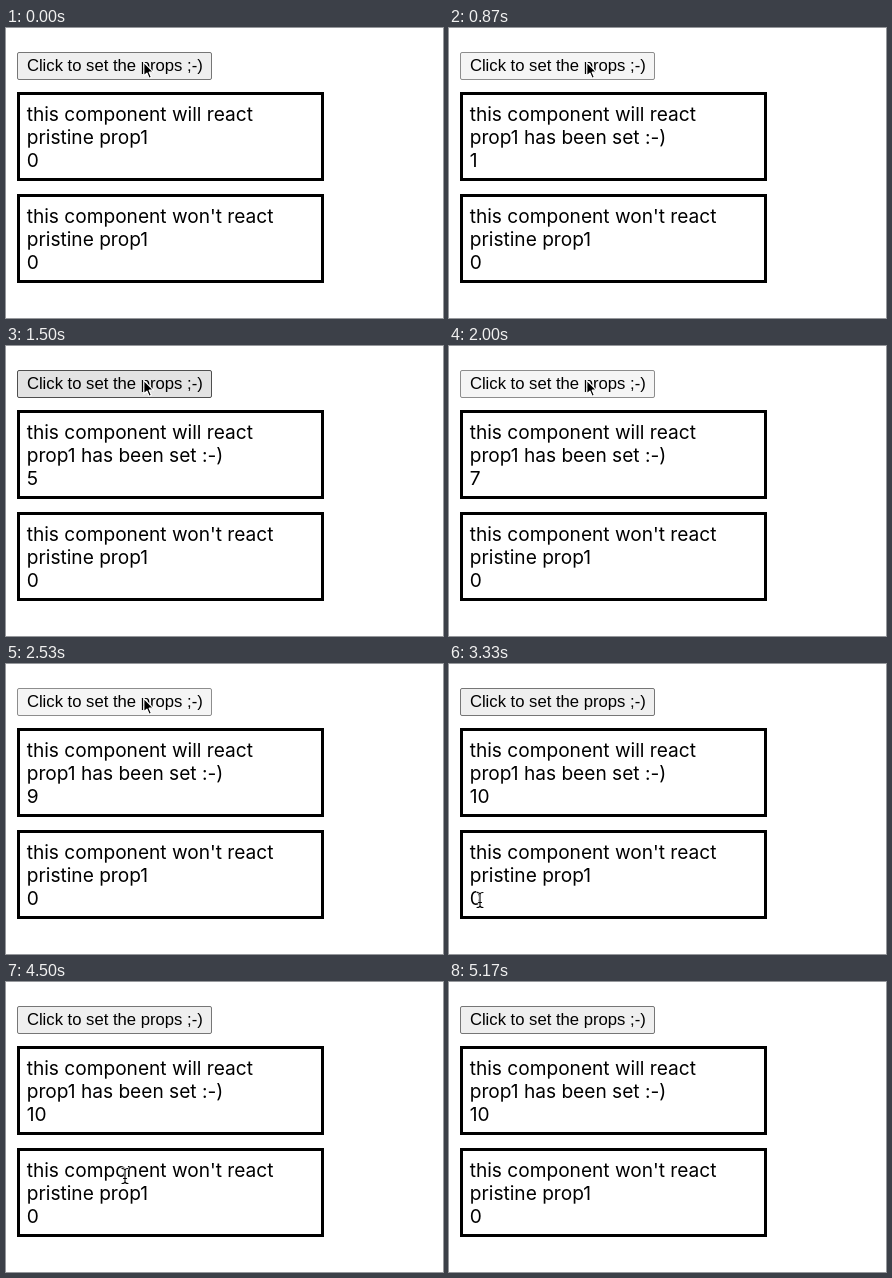
Recreate the animation shown at these times as an HTML page. Size 437x290 px, loop 5710 ms.

```html
<!DOCTYPE html>
<html lang="en">
<head>
<meta charset="utf-8">
<title>Reactive props</title>
<style>
  html, body { margin: 0; width: 100%; height: 100%; overflow: hidden; background: #fff; }
  svg { display: block; }
  text { white-space: pre; fill: #000; }
  .panel text { font: 19.12px Inter, sans-serif; font-feature-settings: "calt" 0; }
  .panel rect { fill: none; stroke: #000; stroke-width: 3; }
  #button { fill: #efefef; stroke: #767676; }
  #button.hover { fill: #e3e3e3; stroke: #4f4f4f; }
  #button.pressed { fill: #f5f5f5; stroke: #8d8d8d; }
  .label { font: 16.67px "Liberation Sans", Arial, sans-serif; }
  #arrow { fill: #000; stroke: #fff; stroke-width: 1.2; stroke-linejoin: round; }
  #beam { fill: none; stroke-linecap: round; }
</style>
</head>
<body>
<svg width="437" height="290" viewBox="0 0 437 290">
  <defs>
    <path id="bar" d="M-3-7.5Q0-7.5 0-5.5Q0-7.5 3-7.5M0-5.5V5.5M-3 7.5Q0 7.5 0 5.5Q0 7.5 3 7.5M-1.5 2.5H1.5"/>
  </defs>

  <rect id="button" x="11.5" y="24.5" width="194" height="27" rx="1.5"/>
  <text class="label" x="20.9" y="43">Click to set the props ;-)</text>

  <g class="panel">
    <rect x="12.5" y="65.5" width="304" height="86"/>
    <text x="20.7" y="93">this component will react</text>
    <text x="20.7" y="116" id="prop">pristine prop1</text>
    <text x="20.7" y="139" id="count">0</text>
  </g>
  <g class="panel" transform="translate(0 102)">
    <rect x="12.5" y="65.5" width="304" height="86"/>
    <text x="20.7" y="93">this component won't react</text>
    <text x="20.7" y="116">pristine prop1</text>
    <text x="20.7" y="139">0</text>
  </g>

  <g id="pointer">
    <path id="arrow" d="M0 0V13.6L3.1 10.7L5.3 15.8L7.6 14.8L5.4 9.8H9.6Z"/>
    <g id="beam">
      <use href="#bar" stroke="#fff" stroke-width="2.4"/>
      <use href="#bar" stroke="#000" stroke-width="1.1"/>
    </g>
  </g>
</svg>
<script>
const LOOP = 5710;

// Evenly spaced clicks, in ms
const bursts = [
  { start: 600, clicks: 1, every: 0, hold: 130 },
  { start: 870, clicks: 7, every: 185, hold: 70 },
  { start: 2370, clicks: 2, every: 160, hold: 100 }
];
const clicks = bursts.flatMap(({ start, clicks, every, hold }) =>
  Array.from({ length: clicks }, (_, i) => {
    const down = start + i * every;
    return { down, up: down + hold };
  }));

const home = [137.8, 34.4];
const moves = [
  { from: 2680, to: 3280, end: [31, 236] },
  { from: 3340, to: 3540, end: [28, 251] },
  { from: 3540, to: 3830, end: [114.5, 202] },
  { from: 3970, to: 4200, end: [69, 238] },
  { from: 4200, to: 4500, end: [119, 194] },
  { from: 4830, to: 4930, end: [126, 200] },
  { from: 5060, to: 5170, end: [235, 320] }
];

const $ = id => document.getElementById(id);
const [button, prop, count, pointer, arrow, beam] =
  ["button", "prop", "count", "pointer", "arrow", "beam"].map($);

const inside = ([x, y], left, top, right, bottom) =>
  x >= left && x <= right && y >= top && y <= bottom;

const clamp = k => Math.min(1, Math.max(0, k));
const ease = k => k * k * (3 - 2 * k);

const pointAt = t => moves.reduce((point, { from, to, end }) => {
  const k = ease(clamp((t - from) / (to - from)));
  return point.map((value, axis) => value + (end[axis] - value) * k);
}, home);

function render(t) {
  const point = pointAt(t);
  const pressed = clicks.some(({ down, up }) => t >= down && t < up);
  const hovered = t >= clicks[0].down && inside(point, 11, 24, 206, 52);
  const total = clicks.filter(({ up }) => t >= up).length;
  const overText = inside(point, 14, 67, 315, 150) || inside(point, 14, 169, 315, 252);

  button.setAttribute("class", pressed ? "pressed" : hovered ? "hover" : "");
  prop.textContent = total ? "prop1 has been set :-)" : "pristine prop1";
  count.textContent = total;
  pointer.setAttribute("transform", `translate(${point})`);
  arrow.style.display = overText ? "none" : "";
  beam.style.display = overText ? "" : "none";
}

let start;
function tick(now) {
  start ??= now;
  render((now - start) % LOOP);
  requestAnimationFrame(tick);
}
render(0);
requestAnimationFrame(tick);
</script>
</body>
</html>
```
